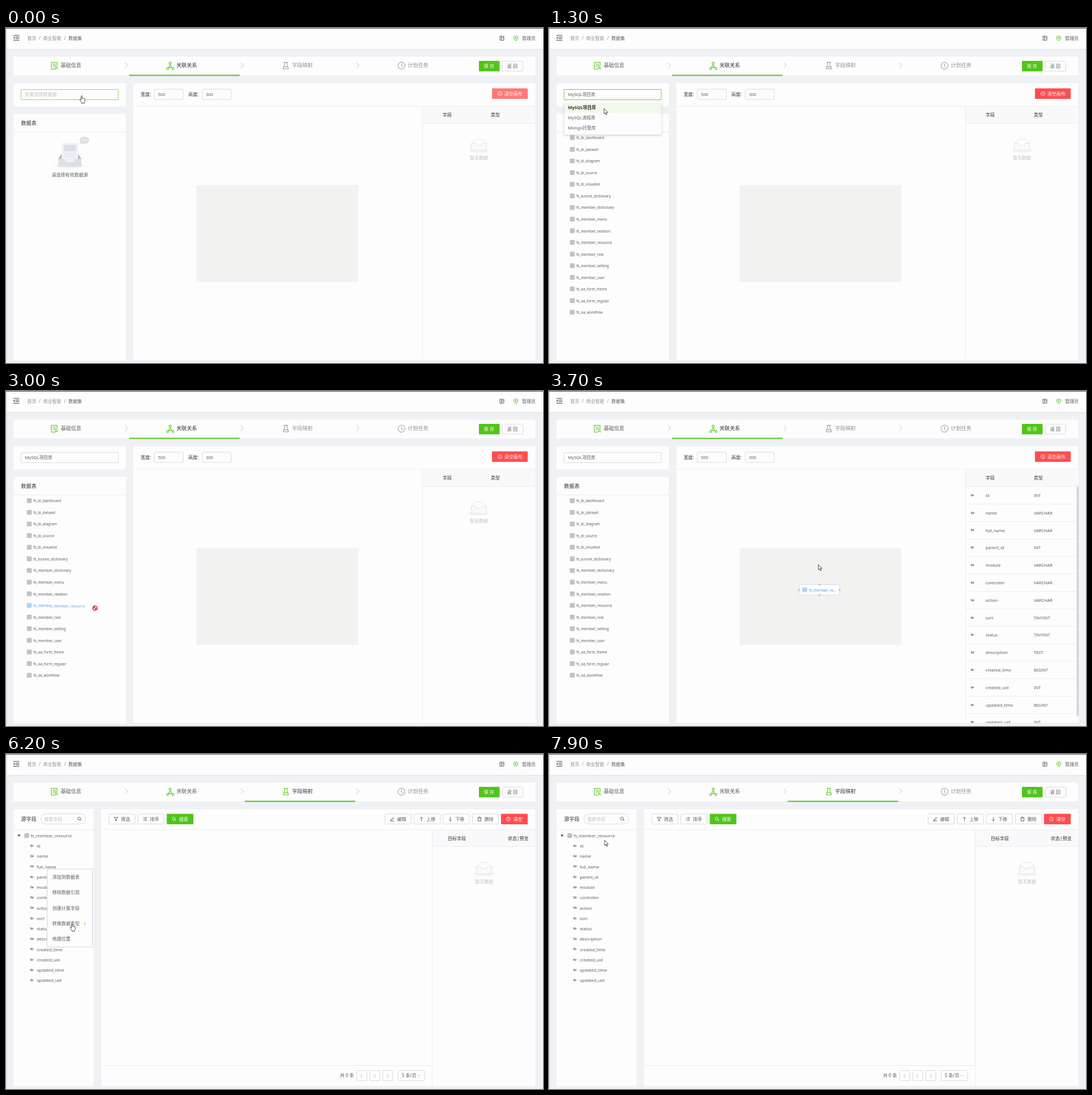
Animation, 947 px wide and 591 px high, one loop 8000 ms. Source, as an HTML page:

```html
<!DOCTYPE html>
<html lang="zh">
<head>
<meta charset="utf-8">
<title>数据集</title>
<style>
html, body { margin: 0; width: 100%; height: 100%; overflow: hidden; background: #eff1f4; }
svg { display: block; width: 947px; height: 591px; }
text { font-family: "Noto Sans", "Noto Sans CJK SC", "Noto Sans CJK", sans-serif; white-space: pre; }
</style>
</head>
<body>
<svg id="stage" viewBox="0 0 947 591" xmlns="http://www.w3.org/2000/svg"></svg>
<script>
const LOOP = 8000, STEP = 100;
const GREEN = '#52c41a', RED = '#ff4d4f', BLUE = '#4a9cf0', PAPER = '#fdfdfd';
const INK = '#333', BODY = '#5c5c5c', MUTED = '#8f8f8f', PALE = '#bfbfbf', LINE = '#ececee', EDGE = '#dadada';

// Drawing helpers; text is placed by its left edge and vertical centre.
const text = (x, y, s, fill = BODY, size = 8, extra = '') =>
  `<text x="${x}" y="${y + size * 0.36}" font-size="${size}" fill="${fill}" ${extra}>${s}</text>`;
const rect = (x, y, w, h, fill, stroke = 'none', r = 0, extra = '') =>
  `<rect x="${x}" y="${y}" width="${w}" height="${h}" rx="${r}" fill="${fill}" stroke="${stroke}" ${extra}/>`;
const path = (d, stroke, width = 1, fill = 'none', extra = '') =>
  `<path d="${d}" stroke="${stroke}" stroke-width="${width}" fill="${fill}" ${extra}/>`;
const circle = (x, y, r, fill, stroke = 'none', width = 1) =>
  `<circle cx="${x}" cy="${y}" r="${r}" fill="${fill}" stroke="${stroke}" stroke-width="${width}"/>`;
const group = (id, body, extra = '') => `<g id="${id}" ${extra}>${body}</g>`;
const at = (x, y, body) => `<g transform="translate(${x} ${y})">${body}</g>`;
const panel = (x, y, w, h) => rect(x, y, w, h, PAPER, '#e9ebee', 1, 'stroke-width=".6"');
const hLine = (x1, x2, y) => path(`M${x1} ${y}H${x2}`, LINE);
const vLine = (x, y1, y2) => path(`M${x} ${y1}V${y2}`, LINE);
const box = (x, y, w, h, stroke = EDGE) => rect(x + .5, y + .5, w - 1, h - 1, PAPER, stroke, 1);

const tableIcon = (x, y, color = '#777') => at(x, y,
  path('M.5-3.5h7v7h-7zM.5-1.2h7M.5 1.2h7M2.9-3.5v7M5.2-3.5v7', color, .6));
const typeIcon = (x, y, numeric) =>
  text(x, y, numeric ? 'Nº' : 'Str', '#444', numeric ? 4.8 : 4.4, 'font-weight="700"');
const chevron = (x, y, w, h, color, width = 1) => path(`M${x} ${y - h}l${w} ${h}l${-w} ${h}`, color, width);
const clock = (x, y, r, color, width) =>
  circle(x, y, r, 'none', color, width) + path(`M${x} ${y - r * .55}V${y + r * .1}l${r * .4} ${r * .35}`, color, width);
const lens = (x, y, color) => circle(x - .6, y - .6, 2.5, 'none', color, .9) + path(`M${x + 1.3} ${y + 1.3}l2.2 2.2`, color, 1);

const emptyTray = (x, y, label) => at(x - 18.2, y, `<g transform="scale(.57)" stroke-width="1.3">
  <ellipse cx="32" cy="35" rx="32" ry="7" fill="#f3f3f4"/>
  <path d="M9 13L20 1q1-1 2-1h20q1 0 2 1L55 13v9H9z" fill="${PAPER}" stroke="#d9d9d9"/>
  <path d="M9 13h11q2.4 0 2.4 3t2.4 3h14.6q2.3 0 2.3-3t2.3-3H55v18q0 4-3 4H12q-3 0-3-4z" fill="#fafafa" stroke="#d9d9d9"/></g>`)
  + text(x - 16, y + 33.5, label, PALE);

const emptySource = `<ellipse cx="112" cy="243" rx="27" ry="4" fill="#f2f3f4"/>
  <path d="M92 231l6-9h29l6 9z" fill="#b3bbc7"/>
  ${rect(98, 203, 29, 34, '#eff1f4', 'none', 1)}${rect(102, 206.5, 21, 11, '#dce1e7')}
  ${path('M102 222h21M102 226h21', '#d9dee5', 1.2)}
  <path d="M92 231h10q2 0 2.500 3t3 3h10q2.500 0 3-3t3-3h9.500v12q0 2-2 2H94q-2 0-2-2z" fill="#dce0e6"/>
  <ellipse cx="138.500" cy="198" rx="8.500" ry="6.500" fill="#dde1e7"/><path d="M131 199l-1 6 6-2z" fill="#dde1e7"/>
  ${[135, 138.5, 142].map(x => circle(x, 198, 1, '#fff')).join('')}` + text(80.5, 259, '请选择有效数据源');

const tables = ['bi_dashboard', 'bi_dataset', 'bi_diagram', 'bi_source', 'bi_visualize', 'lucene_dictionary',
  'member_dictionary', 'member_menu', 'member_relation', 'member_resource', 'member_role', 'member_setting',
  'member_user', 'oa_form_frame', 'oa_form_regular', 'oa_workflow'].map(s => 'fs_' + s);
const fields = ('id INT,name VARCHAR,full_name VARCHAR,parent_id INT,module VARCHAR,controller VARCHAR,action VARCHAR,' +
  'sort TINYINT,status TINYINT,description TEXT,created_time BIGINT,created_uid INT,updated_time BIGINT,updated_uid INT')
  .split(',').map(s => s.split(' '));
const isNumeric = type => type.endsWith('INT');

const header = rect(0, 0, 947, 37, PAPER) + rect(0, 37, 947, 2, '#e6e9ec') + rect(0, 0, 947, 1, '#555') + rect(0, 1, 1.5, 590, '#dfe0e2')
  + path('M13 13h10.500M17 16h6.500M17 18.500h6.500M13 21.500h10.500', '#444') + path('M15.500 15l-2.500 2.200 2.500 2.200z', 'none', 0, '#444')
  + text(37.5, 18, '首页', MUTED) + text(58, 18, '/', MUTED) + text(65.5, 18, '商业智能', MUTED)
  + text(102.5, 18, '/', MUTED) + text(110, 18, '数据集')
  + path('M871 14.500h7v7h-7zM873.500 14.500v7M873.500 17.500h4.500', '#555', .9)
  + path('M899 14l3.500 1.300v3q0 2.500-3.500 4.200q-3.500-1.700-3.500-4.200v-3z', GREEN, 1) + circle(899, 18, 1.4, GREEN)
  + text(910, 18, '管理员');

const flask = 'M490 60.500h7M491.500 60.500v4l-3 7.500h10l-3-7.500v-4M490 68.500h7';
const tabs = panel(13, 50, 921, 34)
  + path('M90 66v-5.500h-10v12h6M82.500 63.500h5M82.500 66h5M82.500 68.500h2.500M86.500 73l1.500-3M91 73l-1.500-3', GREEN, 1.1) + circle(88.5, 68.5, 1.7, 'none', GREEN)
  + text(96.5, 66, '基础信息', BODY, 9.1)
  + path('M289.500 64v3M288 69l-3 2M291 69l3 2', GREEN, 1.2) + circle(289.5, 62.3, 1.9, PAPER, GREEN, 1.1)
  + circle(289.5, 68, 2, PAPER, GREEN, 1.1) + circle(285, 71.5, 1.7, PAPER, GREEN, 1.1) + circle(294.5, 71.5, 1.7, PAPER, GREEN, 1.1)
  + `<g id="tab2">${text(300.5, 66, '关联关系', 'inherit', 9.1).replace('fill="inherit"', '')}</g>`
  + `<g id="tab3">${text(504.5, 66, '字段映射', 'inherit', 9.1).replace('fill="inherit"', '')}</g>`
  + path(flask, MUTED, 1, 'none', 'id="flask"')
  + clock(697.5, 66.5, 6.2, MUTED, 1) + text(708.5, 66, '计划任务', MUTED, 9.1)
  + [210, 414, 618].map(x => chevron(x, 66, 4.5, 5, '#c4c4c4')).join('')
  + rect(834, 58, 36.5, 18.5, GREEN, 'none', 1) + text(842.8, 67.3, '保 存', '#fff')
  + box(875, 58, 37, 18.5) + text(883.8, 67.3, '返 回')
  + rect(0, 82.5, 0, 2, GREEN, 'none', 0, 'id="bar2"') + rect(0, 82.5, 0, 2, GREEN, 'none', 0, 'id="bar3"');

const fieldRows = fields.map(([name, type], i) => {
  const y = 184.3 + i * 30.8;
  return typeIcon(744, y, isNumeric(type)) + text(770, y, name, BODY, 7.4) + text(855, y, type, BODY, 7.4) + hLine(735, 930, y + 15.2);
}).join('');

const node = rect(441, 341.5, 71.5, 18.5, PAPER, '#c9d6e4', 2, 'stroke-width=".8"') + tableIcon(447, 350.5, BLUE)
  + text(458.5, 351.2, 'fs_member_re...', BLUE, 6.4)
  + [[441, 351], [512.5, 351], [477, 341.5], [477, 360]].map(([x, y]) => circle(x, y, 1.4, '#c8ccd0', '#aaa', .5)).join('');

const relation = panel(13, 97, 199, 42) + rect(26.5, 108.5, 171.5, 18, PAPER, EDGE, 1, 'id="picker"')
  + group('placeholder', text(33.5, 117.5, '检索选择数据源', PALE)) + group('picked', text(33.5, 117.5, 'MySQL项目库', BODY, 7.7))
  + panel(13, 151, 199, 436) + text(26.5, 167.5, '数据表', INK, 9.1) + hLine(13, 212, 183.5)
  + group('noSource', emptySource)
  + group('tableList', tables.map((s, i) => {
    const y = 194 + i * 20.53;
    return tableIcon(37, y - .5) + text(48.3, y, s, BODY, 6.4);
  }).join(''))
  + group('dragged', rect(36, 372, 80, 14, PAPER) + tableIcon(37, 378.3, BLUE) + text(48.3, 378.8, tables[9], BLUE, 6.4))
  + panel(224, 97, 710, 489) + hLine(224, 934, 138) + vLine(734.5, 138, 586)
  + text(237.5, 117, '宽度:', INK) + box(261, 107.5, 52, 19) + text(268, 117, '500', BODY, 7.5)
  + text(321.5, 117, '高度:', INK) + box(345.5, 107.5, 52, 19) + text(352.5, 117, '300', BODY, 7.5)
  + rect(857, 106.500, 63, 18.5, RED, 'none', 1, 'id="clear"') + clock(871, 115.8, 3.5, '#fff', .8) + text(878.8, 115.8, '清空画布', '#fff')
  + rect(336, 277, 285.5, 171, '#f2f2f1')
  + rect(735, 139, 199, 29, '#f9f9fb') + text(770, 153.5, '字段', INK) + text(855, 153.5, '类型', INK) + hLine(735, 934, 168)
  + group('noFields', emptyTray(834, 196, '暂无数据'))
  + group('fieldList', fieldRows + rect(930.5, 168, 3.5, 406, '#d2d3d5', 'none', 1.5), 'clip-path="url(#fieldArea)"')
  + group('node', node)
  + group('options', rect(27, 130, 171, 58, PAPER, 'none', 1, 'filter="url(#shadow)"')
    + rect(27, 132, 171, 18, '#f1faea') + group('optPlain', text(33.5, 140.5, 'MySQL项目库', BODY, 7.7))
    + group('optBold', text(33.5, 140.5, 'MySQL项目库', INK, 7.7, 'font-weight="600"'))
    + text(33.5, 158.5, 'MySQL流程库', BODY, 7.7) + text(33.5, 176.5, 'Mongo托管库', BODY, 7.7))
  + group('ghost', rect(0, -5, 64, 10, PAPER, 'none', 0, 'opacity=".85"') + text(0, 0, tables[9], '#6aaef3', 6.4));

const tools = [
  [181, '筛选', 'M-3.500-3h7l-2.700 3.300v3h-1.600v-3z'], [232, '排序', 'M-1.500-2.500h5M-1.500 0h5M-1.500 2.500h5M-3.500-2.500h1M-3.500 0h1M-3.500 2.500h1'],
  [283.5, '搜索', '', GREEN], [668, '编辑', 'M-3.500 3.500h7M-2.500 1.500l4-4 1.200 1.200-4 4h-1.200z'],
  [719.5, '上移', 'M0 3.500v-7M-2.500-1l2.500-2.500 2.500 2.500'], [770.5, '下移', 'M0-3.500v7M-2.500 1l2.500 2.500 2.500-2.500'],
  [822, '删除', 'M-3.500-2h7M-1.200-2v-1.500h2.400v1.500M-2.500-2v5.500h5v-5.500'], [873, '清空', '', RED]
].map(([x, label, d, fill]) => {
  const color = fill ? '#fff' : BODY;
  const icon = d ? at(x + 13, 114.7, path(d, color, .9)) : fill === GREEN ? lens(x + 13, 114.7, color) : clock(x + 13, 114.7, 3.4, color, .8);
  return (fill ? rect(x, 105.500, 47, 18.500, fill, 'none', 1) : box(x, 105.5, 47, 18.5)) + icon + text(x + 21.700, 114.7, label, color);
}).join('');

const mapping = panel(13, 97, 142, 489) + hLine(13, 155, 133.5) + text(26.5, 115, '源字段', INK, 9.1)
  + rect(61.5, 105.5, 79, 18, PAPER, EDGE, 9) + text(67.5, 115, '搜索字段', PALE) + lens(129.5, 114.5, '#555')
  + path('M20.500 142.500h5l-2.500 3.500z', 'none', 0, INK) + tableIcon(32.5, 144) + text(43.5, 144, tables[9], BODY, 7.4)
  + fields.map(([name, type], i) => typeIcon(43, 162 + i * 18.27, isNumeric(type)) + text(54.3, 162.3 + i * 18.27, name, BODY, 7.4)).join('')
  + panel(167, 97, 767, 489) + hLine(167, 934, 133.5) + tools
  + vLine(751.5, 134, 586) + hLine(167, 751, 549.5)
  + rect(752, 134, 182, 29, '#f9f9fb') + text(779, 149, '目标字段', INK) + text(885, 149, '状态|预览', INK) + hLine(752, 934, 163)
  + emptyTray(843, 191.5, '暂无数据')
  + text(589, 567.5, '共 0 条') + [618, 641, 664].map(x => box(x, 558, 18.5, 19)).join('')
  + chevron(629, 567.5, -3.5, 3, PALE) + text(647.7, 567.5, '0', PALE, 7.5) + chevron(671.5, 567.5, 3.5, 3, PALE)
  + box(691, 558, 47.5, 19) + text(698, 567.5, '5 条/页') + path('M725.500 566l2.500 2.500 2.500-2.500', PALE);

const menuItems = (x, y, labels) => labels.map((s, i) => text(x, y + i * 27.4, s)).join('');
const menus = group('menu', rect(72.5, 203, 80, 137.5, PAPER, '#d4d4d8', 1)
    + menuItems(81.8, 217, ['添加到数据表', '移除数据引用', '创建计算字段', '转换数据类型', '地理位置']) + chevron(138, 299.3, 2.2, 2.2, GREEN))
  + group('submenu', rect(152.5, 176.500, 93, 246.500, PAPER, '#d4d4d8', 1)
    + menuItems(162, 190.5, ['整数', '小数', '文本', '布尔', '日期', '时间', '日期时间', '数组', '默认']));

const cursors = group('cursor',
  group('hand', path('M-1.500 7v-6q0-1.200 1-1.200t1 1.200v4q.8-1 1.600 0 .8-.8 1.600.2 1.500-.4 1.500 1.200v2.600q0 1-1 2.500v1.500h-5v-1.500l-3-4.500q-.4-1.400.8-1.300z', '#222', .8, '#fff'))
  + group('arrow', path('M0 0v9.500l2.200-2 1.600 3.600 1.500-.7-1.600-3.400h3z', '#222', .8, '#fff'))
  + group('beam', path('M-2-4h1.500l.5.500.5-.5h1.500M0-3.500v7M-2 4h1.500l.5-.5.5.5h1.500', '#222', .9))
  + group('denied', circle(0, 0, 4, '#fff', '#fff', 3) + circle(0, 0, 3.7, '#fff', '#c8102e', 1.6) + path('M-2.600-2.600l5.200 5.200', '#c8102e', 1.5)));

document.getElementById('stage').innerHTML = `<defs>
  <clipPath id="fieldArea"><rect x="735" y="168" width="199" height="418"/></clipPath>
  <filter id="shadow" x="-10%" y="-20%" width="120%" height="150%"><feDropShadow dx="0" dy="1.500" stdDeviation="2" flood-opacity=".18"/></filter>
  </defs>` + rect(0, 0, 947, 591, '#eff1f4') + header + tabs
  + group('relation', relation) + group('mapping', mapping + menus) + cursors;

const el = Object.fromEntries([...document.querySelectorAll('[id]')].map(e => [e.id, e]));
const show = (id, on) => el[id].setAttribute('display', on ? 'inline' : 'none');
const ramp = (t, a, b) => Math.min(1, Math.max(0, (t - a) / (b - a)));
const smooth = p => p * p * (3 - 2 * p);

// Pointer stops: time, x, y.
const stops = [[0, 134, 119.5], [300, 134, 119.5], [800, 97, 142], [1300, 97, 142], [2000, 83, 375], [2400, 83, 375],
  [2700, 93, 383], [2900, 93, 383], [3000, 157, 383], [3500, 477, 351], [3600, 477, 345], [3700, 475, 306], [3800, 485, 143],
  [4400, 525, 72], [4600, 525, 72], [5400, 72, 203], [5600, 72, 203], [6200, 117, 299.5], [6400, 117, 299.5],
  [6700, 172, 297], [7200, 196, 245], [7800, 98, 152], [LOOP, 98, 152]];
function pointer(t) {
  const i = Math.max(1, stops.findIndex(s => s[0] >= t));
  const [a, b] = [stops[i - 1], stops[i]], p = smooth(ramp(t, a[0], b[0]));
  return [a[1] + (b[1] - a[1]) * p, a[2] + (b[2] - a[2]) * p];
}
function setBar(id, centre, p) {
  el[id].setAttribute('x', centre - 97.5 * p);
  el[id].setAttribute('width', 195 * p);
}

function draw(t) {
  const [x, y] = pointer(t);
  const loaded = t >= 1200, dragging = t >= 3000 && t < 3500, second = t >= 4600;
  const menuOpen = t >= 5500 && t < 7300;
  show('relation', !second);
  show('mapping', second);
  show('placeholder', !loaded);
  show('picked', loaded);
  show('noSource', !loaded);
  show('tableList', loaded);
  show('options', t >= 300 && t < 1600);
  el.options.setAttribute('opacity', ramp(t, 200, 500) * (1 - ramp(t, 1300, 1600)));
  show('optPlain', !loaded);
  show('optBold', loaded);
  el.picker.setAttribute('stroke', t < 1800 ? (t >= 300 ? '#6fce42' : '#8fd86a') : EDGE);
  const fade = ramp(t, 0, 300);
  el.clear.setAttribute('fill', `rgb(255 ${120 - 43 * fade} ${117 - 38 * fade})`);

  show('dragged', dragging);
  show('ghost', dragging);
  el.ghost.setAttribute('transform', `translate(${x - 80.5} ${y - 3.7})`);
  show('node', t >= 3500);
  show('noFields', t < 3600);
  show('fieldList', t >= 3600);

  const p = t < 4600 ? 0 : t < 4700 ? .25 : t < 4800 ? .82 : 1;
  setBar('bar2', 314.5, 1 - p);
  setBar('bar3', 518.5, p);
  const tab3On = t >= 4300;
  el.tab2.setAttribute('fill', t < 4800 ? INK : BODY);
  el.tab3.setAttribute('fill', tab3On ? INK : MUTED);
  el.flask.setAttribute('stroke', tab3On ? GREEN : MUTED);

  show('menu', menuOpen);
  show('submenu', t >= 6500 && t < 7300);

  const kind = t < 1200 || (t >= 5700 && menuOpen) ? 'hand'
    : dragging && x < 336 ? 'denied'
    : t >= 4300 && t < 4700 ? 'beam' : 'arrow';
  for (const k of ['hand', 'arrow', 'beam', 'denied']) show(k, k === kind);
  el.cursor.setAttribute('transform', `translate(${x} ${y})`);
}

function tick() {
  draw(Math.floor(performance.now() % LOOP / STEP) * STEP);
  requestAnimationFrame(tick);
}
tick();
</script>
</body>
</html>
```
